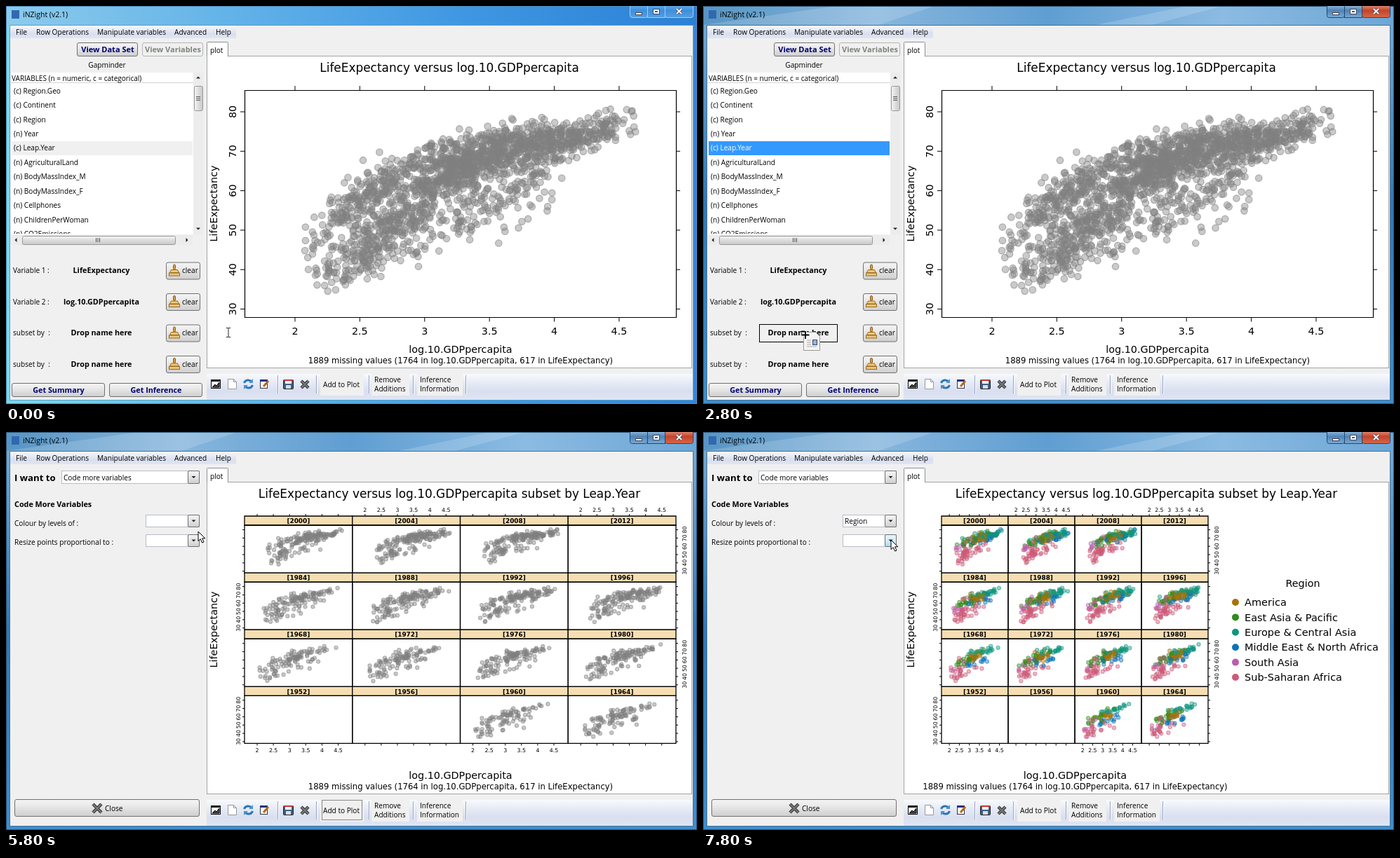
Animation, 985 px wide and 568 px high, one loop 8000 ms. Source, as an HTML page with a canvas:

```html
<!DOCTYPE html>
<html lang="en">
<head>
<meta charset="utf-8">
<title>iNZight</title>
<style>
html, body { margin: 0; width: 985px; height: 568px; overflow: hidden; background: #f0f0f0; }
body > svg, canvas { position: absolute; left: 0; top: 0; }
text { white-space: pre; }
.ui { font-family: "Open Sans", "Noto Sans", sans-serif; }
.plot { font-family: "DejaVu Sans", sans-serif; }
</style>
</head>
<body>
<svg id="base" width="985" height="568" viewBox="0 0 985 568"></svg>
<canvas id="dots" width="985" height="568"></canvas>
<svg id="top" width="985" height="568" viewBox="0 0 985 568"></svg>
<script>
const base = document.getElementById('base'), top_ = document.getElementById('top');
const ctx = document.getElementById('dots').getContext('2d');

// ---- drawing helpers ----
function el(parent, tag, attrs = {}) {
  const e = document.createElementNS('http://www.w3.org/2000/svg', tag);
  for (const k in attrs) e.setAttribute(k, attrs[k]);
  return parent.appendChild(e);
}
const group = (p, attrs) => el(p, 'g', attrs);
function box(p, x, y, w, h, fill, stroke, rx = 0) {
  const o = stroke ? 0.5 : 0;
  return el(p, 'rect', { x: x + o, y: y + o, width: w - 2 * o, height: h - 2 * o, fill, stroke: stroke || 'none', rx });
}
const path = (p, d, stroke, width = 1, fill = 'none') =>
  el(p, 'path', { d, fill, stroke: stroke || 'none', 'stroke-width': width });
// y is the middle of the capitals
function text(p, s, x, y, o = {}) {
  const size = o.size || 10.1;
  const a = { x, y: y + size * 0.36, 'font-size': size, fill: o.fill || '#000', class: o.plot ? 'plot' : 'ui', 'text-anchor': o.anchor || 'start' };
  if (o.bold) a['font-weight'] = 700;
  if (o.turn) a.transform = `rotate(-90 ${x} ${y})`;
  const t = el(p, 'text', a);
  t.textContent = s;
  return t;
}
const bold = (p, s, x, y, o) => text(p, s, x, y, { size: 10.8, bold: 1, anchor: 'middle', ...o });
const label = (p, s, x, y, size = 14.3, o) => text(p, s, x, y, { size, plot: 1, anchor: 'middle', ...o });

const defs = el(base, 'defs');
function gradient(id, vertical, ...stops) {
  const g = el(defs, 'linearGradient', vertical ? { id, x2: 0, y2: 1 } : { id });
  stops.forEach((c, i) => el(g, 'stop', { offset: i / (stops.length - 1), 'stop-color': c }));
}
gradient('btn', 1, '#f4f4f4', '#ebebeb', '#dcdcdc', '#cfcfcf');
gradient('btnBlue', 1, '#e6f5fd', '#d2edfb', '#a9daf5');
gradient('bar', 1, '#f8fafd', '#e6ebf6', '#d9dfef', '#dfe5f3');
gradient('thumb', 0, '#f5f5f5', '#dcdcdc', '#c8c8c8');
gradient('thumbH', 1, '#f5f5f5', '#dcdcdc', '#c8c8c8');
gradient('idle', 0, '#8ccbec', '#62b2e8', '#3f97e2', '#2b80d6');
gradient('idleFrame', 0, '#7ad9ea', '#5cbcea', '#3f9ee6', '#2f86dc');
gradient('live', 0, '#5795c4', '#87b6dd', '#5f9ed2', '#8bbbe2', '#6da6d6');
gradient('liveFrame', 1, '#79aed8', '#2f78b8', '#3d8fd0');
gradient('red', 1, '#e8a28f', '#c4432a', '#d6684a');
gradient('cap', 1, '#6db2ea', '#3f8edb', '#559fe2');
gradient('capLive', 1, '#a6c8e6', '#4f83b5', '#79aad6');

const button = (p, x, y, w, h, fill = 'url(#btn)') => box(p, x, y, w, h, fill, '#707070', 2.5);
const cross = (p, x, y, s = 5) => {
  const d = `M${x - s},${y - s}L${x + s},${y + s}M${x + s},${y - s}L${x - s},${y + s}`;
  path(p, d, '#333', 4.4);
  path(p, d, '#777', 2.4);
};
const arrow = (p, x, y, dir, s = 3) => path(p, {
  up: `M${x - s},${y + 1.5}h${2 * s}l${-s},${-s}z`, down: `M${x - s},${y - 1.5}h${2 * s}l${-s},${s}z`,
  left: `M${x + 1.5},${y - s}v${2 * s}l${-s},${-s}z`, right: `M${x - 1.5},${y - s}v${2 * s}l${s},${-s}z`
}[dir], 0, 0, '#222');
const grip = (p, x, y, flat) => {
  for (let k = -1; k < 2; k++) path(p, flat ? `M${x + k * 2.5},${y - 3}v6` : `M${x - 3},${y + k * 2.5}h6`, '#555', 1);
};

// ---- window chrome ----
function chrome(live) {
  const g = group(base), n = live ? 'live' : 'idle';
  box(g, 0, 0, 985, 568, `url(#${n}Frame)`);
  box(g, 0, 0, 985, 27, `url(#${n})`);
  if (live) path(g, 'M0,27L190,0H330L250,27zM560,27L690,0H740L640,27z', 0, 0, 'rgba(255,255,255,.16)');
  box(g, 0, 0, 985, 568, 'none', live ? '#28506f' : '#4a8cba');
  const edge = live ? '#24476b' : '#a4cdf0', cap = live ? 'url(#capLive)' : 'url(#cap)';
  box(g, 889, -4, 26, 21, cap, edge, 3);
  box(g, 914, -4, 26, 21, cap, edge);
  box(g, 939, -4, 41, 21, live ? 'url(#red)' : cap, edge, 3);
  box(g, 897, 9, 10, 4, '#fff', '#445');
  box(g, 922, 4, 10, 8, '#fff', '#445');
  box(g, 925, 7, 4, 2, '#557');
  const x = 'M956,4l7,7M963,4l-7,7';
  path(g, x, '#445', 3.6);
  path(g, x, '#fff', 2);
  box(g, 5, 27, 975, 536, '#f0f0f0', live ? '#46708f' : '#5f9cc4');
  return g;
}
const idle = chrome(false), live = chrome(true);
box(base, 8, 6, 11, 12, '#3268b0');
text(base, 'iNZight (v2.1)', 24, 12, { size: 10.5 });

box(base, 6, 28, 322, 18, 'url(#bar)');
[['File', 14], ['Row Operations', 43], ['Manipulate variables', 130], ['Advanced', 240], ['Help', 299]]
  .forEach(([s, x]) => text(base, s, x, 37));
box(base, 286, 71, 692, 446, '#fff', '#a0a3a8');
box(base, 286, 51, 31, 22, '#fff', '#8e9095', 1);
box(base, 287, 70, 29, 4, '#fff');
text(base, 'plot', 291, 63);

// ---- toolbar ----
box(base, 286, 525, 693, 37, 'url(#bar)');
[387, 442, 517, 580, 655].forEach(x => {
  box(base, x, 527, 1, 26, '#9aa3bb');
  box(base, x + 1, 527, 1, 26, '#fff');
});
const hoverX = group(base);
button(hoverX, 414, 523, 23, 33);
[[448, 62], [521, 54], [586, 65]].forEach(([x, w]) => box(base, x, 524, w, 32, '#f0f0f0'));
const hoverAdd = group(base), focusAdd = group(base);
button(hoverAdd, 448, 523, 62, 33);
box(focusAdd, 450, 525, 58, 29, 'none', '#222').setAttribute('stroke-dasharray', '1 1');
text(base, 'Add to Plot', 452, 540);
text(base, 'Remove', 525, 533);
text(base, 'Additions', 525, 546.5);
text(base, 'Inference', 590, 533);
text(base, 'Information', 590, 546.5);
box(base, 292, 533, 14, 13, '#fff', '#000');
box(base, 292, 533, 14, 3, '#111');
path(base, 'M294,544l4,-4 2,2 4,-5v7z', '#000', 1, '#444');
path(base, 'M316.5,532.5h8l4,4v10h-12zM324.5,532.5v4h4', '#999', 1, '#fff');
path(base, 'M339.5,538a6,5.5 0 0 1 10.5,-2M351.5,541a6,5.5 0 0 1 -10.5,2', '#2f76b5', 3);
path(base, 'M352,532v6h-6zM339,547v-6h6z', 0, 0, '#4a93cf');
box(base, 362, 533, 11, 13, '#fff', '#334');
box(base, 362, 533, 11, 3, '#237');
path(base, 'M367,543l7,-8', '#b5651d', 3);
box(base, 395, 533, 15, 14, '#3d5f86', '#222', 1);
box(base, 398, 534, 9, 5, '#fff');
box(base, 396, 533, 13, 2, '#c33');
box(base, 399, 541, 7, 5, '#ddd');
cross(base, 426, 540);

// ---- variable panel ----
const vars = ['(c) Region.Geo', '(c) Continent', '(c) Region', '(n) Year', '(c) Leap.Year', '(n) AgriculturalLand',
  '(n) BodyMassIndex_M', '(n) BodyMassIndex_F', '(n) Cellphones', '(n) ChildrenPerWoman', '(n) CO2Emissions'];

function clearButton(p, x, y) {
  button(p, x, y - 12, 49, 25);
  box(p, x + 10, y - 9, 4, 8, '#d8a04a', '#8a5a1c', 1.5);
  path(p, `M${x + 5.5},${y + 3}l2,-4h9l2,4z`, '#9a6b22', 1, '#efc778');
  box(p, x + 4, y + 3, 16, 5, '#e9c47c', '#9a6b22');
  text(p, 'clear', x + 23, y);
}

function variablePanel(multi) {
  const g = group(base), dy = multi ? -34 : 0, h = 214 + dy;
  button(g, 101, 52, 87, 20);
  bold(g, 'View Data Set', 145, 62, { fill: '#000070', size: 11 });
  box(g, 194, 52, 87, 20, '#f0f0f0', '#b5b5b5', 2.5);
  bold(g, 'View Variables', 238, 62, { fill: '#7d857d', size: 11 });
  text(g, 'Gapminder', 144, 84, { anchor: 'middle' });

  box(g, 7, 95, 260, 231 + dy, '#fff');
  box(g, 7, 109, 260, 1, '#d0d3d8');
  text(g, 'VARIABLES (n = numeric, c = categorical)', 8, 103, { size: 10 });
  const list = el(g, 'svg', { x: 7, y: 111, width: 260, height: h, viewBox: `7 111 260 ${h}` });
  const row = box(list, 8, 193, 258, 20, '#f0f0f0');
  const names = vars.map((s, i) => text(list, s, 11, 121 + 20.45 * i));
  box(g, 267, 95, 14, 231 + dy, '#ececec');
  arrow(g, 274, 102, 'up');
  arrow(g, 274, 318 + dy, 'down');
  const th = multi ? 24 : 36;
  box(g, 268, 114, 13, th, 'url(#thumb)', '#979797', 2);
  grip(g, 274, 114 + th / 2);
  box(g, 7, 327 + dy, 259, 14, '#ececec');
  arrow(g, 14, 334 + dy, 'left');
  arrow(g, 258, 334 + dy, 'right');
  box(g, 23, 328 + dy, 219, 13, 'url(#thumbH)', '#979797', 2);
  grip(g, 131, 334 + dy, true);

  const bx = multi ? 231 : 228, drop = 'Drop name here';
  [['Variable 1 :', 'LifeExpectancy', 377.5 + dy], ['Variable 2 :', 'log.10.GDPpercapita', 422 + dy],
    ['subset by  :', multi ? 'Leap.Year' : drop, 466.5 + dy], ['subset by  :', drop, 511]]
    .forEach(([a, b, y]) => {
      text(g, a, 10, y);
      bold(g, b, 136, y);
      clearButton(g, bx, y);
    });
  if (multi) {
    text(g, '_MULTI', 8, 462);
    box(g, 9, 479, 235, 1, '#b0b0b0');
    box(g, 9, 472, 9, 14, 'url(#btn)', '#777', 2);
    button(g, 252, 456, 29, 32);
    text(g, 'play', 267, 472, { anchor: 'middle' });
  }
  [['Get Summary', 8], ['Get Inference', 147]].forEach(([s, x]) => {
    button(g, x, 538, 133, 20);
    bold(g, s, x + 67, 548.5, { fill: '#000070' });
  });
  return {
    g,
    select(on) {
      row.setAttribute('fill', on ? '#3399ff' : '#f0f0f0');
      names[4].setAttribute('fill', on ? '#fff' : '#000');
    }
  };
}
const plain = variablePanel(false), subset = variablePanel(true);
const dropBox = box(base, 80, 454, 112, 26, 'none', '#000');

// ---- coding panel ----
const coding = group(base);
function combo(x, y, w, h) {
  box(coding, x, y, w, h, '#fff', '#b8bcc4');
  const b = box(coding, x + w - 17, y, 17, h, 'url(#btn)', '#707070', 1.5);
  arrow(coding, x + w - 8.5, y + h / 2, 'down');
  return on => b.setAttribute('fill', on ? 'url(#btnBlue)' : 'url(#btn)');
}
bold(coding, 'I want to', 12, 65, { size: 13.2, anchor: 'start' });
combo(79, 55, 197, 19);
text(coding, 'Code more variables', 82, 65);
bold(coding, 'Code More Variables', 12, 103, { anchor: 'start' });
text(coding, 'Colour by levels of :', 12, 130);
text(coding, 'Resize points proportional to :', 12, 157.5);
const colourHot = combo(199, 118, 77, 18), resizeHot = combo(199, 146, 77, 18);
const chosen = text(coding, 'Region', 202, 127);
button(coding, 12, 524, 264, 25);
cross(coding, 130, 537, 6);
text(coding, 'Close', 141, 537);

// ---- data: one trail of yearly values per country ----
const regions = [ // name, colour, countries, log GDP, spread, life at start, gain, slope, life spread
  ['America', '#a8720a', 34, 3.25, 0.3, 62.5, 10, 7, 2.2],
  ['East Asia & Pacific', '#2f8b1c', 24, 2.85, 0.42, 59, 10, 9, 3],
  ['Europe & Central Asia', '#0e9580', 50, 3.62, 0.46, 69.5, 5, 4.5, 1.3],
  ['Middle East & North Africa', '#0b73b8', 19, 3.35, 0.42, 57, 14.5, 7, 2.5],
  ['South Asia', '#bb5cae', 8, 2.3, 0.15, 46, 17, 9, 4],
  ['Sub-Saharan Africa', '#cc5a78', 47, 2.36, 0.2, 44, 9, 8, 4.5]
];
let seed = 20;
function rnd() {
  seed = (seed + 0x6D2B79F5) | 0;
  let z = Math.imul(seed ^ (seed >>> 15), 1 | seed);
  z = (z + Math.imul(z ^ (z >>> 7), 61 | z)) ^ z;
  return ((z ^ (z >>> 14)) >>> 0) / 4294967296;
}
const gauss = () => (rnd() + rnd() + rnd() - 1.5) * 2;
// bends v smoothly so that it stays within reach of a limit
const bend = (v, from, reach) => (v - from) * reach > 0 ? from + reach * Math.tanh((v - from) / reach) : v;

const data = [];
for (const [name, colour, count, mean, sd, life, gain, slope, spread] of regions) {
  const africa = name.startsWith('Sub');
  for (let c = 0; c < count; c++) {
    const rich = africa && rnd() < 0.35 ? rnd() * 1.1 : 0;
    const dg = gauss() * sd, dl = gauss() * spread, start = rnd(), order = rnd();
    for (let year = 1960; year <= 2008; year += 4) {
      const u = (year - 1960) / 48;
      if (start > 0.5 + 0.5 * u) continue;
      const trend = bend(bend(mean + dg + rich + u * 0.4, 4.2, 0.4), 2.3, -0.25);
      const g = trend + gauss() * 0.05;
      let y = life + gain * u + dl + gauss() * 1.6 + slope * (dg * (1.1 - 0.4 * u) + rich);
      const cap = 75 + (g - 2.9) * 4.4;
      if (y > cap - 3) y = bend(y, cap - 3, 3);
      data.push({ g, y: bend(y, 38, -7), year, colour, order });
    }
  }
}
data.sort((a, b) => a.order - b.order);

// ---- plots ----
const fracX = g => 0.117 + (g - 2) * 0.3005, fracY = y => 0.037 + (y - 30) * 0.01735;
const xTicks = [2, 2.5, 3, 3.5, 4, 4.5], yTicks = [30, 40, 50, 60, 70, 80];
const L = 340, T = 120, H = 324.5, title = 'LifeExpectancy versus log.10.GDPpercapita';

function plotFrame(heading, mid) {
  const g = group(base);
  label(g, heading, 632, 88, 16.93);
  label(g, 'LifeExpectancy', 296, 282, 14.3, { turn: 1 });
  label(g, 'log.10.GDPpercapita', mid, 490);
  label(g, '1889 missing values (1764 in log.10.GDPpercapita, 617 in LifeExpectancy)', mid, 506, 11.6);
  return g;
}
function singlePlot() {
  const g = plotFrame(title, 648), W = 615;
  path(g, `M${L + 0.5},${T + 0.5}h${W}v${H - 0.5}h${-W}z`, '#000', 1.2);
  for (const v of xTicks) {
    const x = L + fracX(v) * W;
    path(g, `M${x},${T}v-6M${x},${T + H}v6`, '#000');
    label(g, v, x, 463.5);
  }
  for (const v of yTicks) {
    const y = T + H - fracY(v) * H;
    path(g, `M${L},${y}h-6M${L + W},${y}h6`, '#000');
    label(g, v, 323, y, 14.3, { turn: 1 });
  }
  return g;
}
const rowH = 81.1, strip = 13, bodyH = rowH - strip;
function gridPlot(W, mid) {
  const g = plotFrame(title + ' subset by Leap.Year', mid), cw = W / 4;
  for (let r = 0; r < 4; r++) for (let c = 0; c < 4; c++) {
    const x = L + c * cw, y = T + r * rowH;
    path(g, `M${x},${y}h${cw}v${strip}h${-cw}z`, '#000', 1.3, '#f6deb2');
    path(g, `M${x},${y + strip}h${cw}v${bodyH}h${-cw}z`, '#000', 1.3);
    label(g, `[${1952 + 4 * ((3 - r) * 4 + c)}]`, x + cw / 2, y + 7, 8.9, { bold: 1 });
  }
  for (let k = 0; k < 4; k++) {
    for (const v of xTicks) {
      const x = L + (k + fracX(v)) * cw;
      path(g, `M${x},${T}v-3M${x},${T + H}v3`, '#000');
      label(g, v, x, k % 2 ? 111.5 : 454, 7.8);
    }
    for (const v of yTicks) {
      const y = T + (k + 1) * rowH - fracY(v) * bodyH;
      path(g, `M${L},${y}h-3M${L + W},${y}h3`, '#000');
      label(g, v, k % 2 ? 331 : L + W + 12, y, 7.8, { turn: 1 });
    }
  }
  return g;
}
const plots = [singlePlot(), gridPlot(615, 648), gridPlot(380, 530.5)];
label(plots[2], 'Region', 855, 215.5);
regions.forEach(([name, colour], i) => {
  const y = 243 + i * 21.4;
  el(plots[2], 'circle', { cx: 759, cy: y, r: 5, fill: colour });
  label(plots[2], name, 772, y, 14.5, { anchor: 'start' });
});

function drawDots(kind) {
  ctx.clearRect(0, 0, 985, 568);
  const single = kind === 0, cw = single ? 615 : kind === 1 ? 615 / 4 : 95;
  ctx.lineWidth = single ? 1.3 : 1.1;
  for (const d of data) {
    const k = (d.year - 1952) / 4, col = single ? 0 : k % 4, row = single ? 3 : 3 - Math.floor(k / 4);
    const x = L + (col + fracX(d.g)) * cw;
    const y = single ? T + H - fracY(d.y) * H : T + (row + 1) * rowH - fracY(d.y) * bodyH;
    ctx.beginPath();
    ctx.arc(x, y, single ? 4.7 : 2.6, 0, 7);
    ctx.fillStyle = ctx.strokeStyle = kind === 2 ? d.colour : '#808080';
    ctx.globalAlpha = 0.42;
    ctx.fill();
    ctx.globalAlpha = 0.55;
    ctx.stroke();
  }
}

// ---- drop-down list ----
const popup = group(top_);
box(popup, 199, 136, 77, 440, '#fff', '#888');
box(popup, 261, 137, 14, 431, '#ececec');
arrow(popup, 268, 146, 'up');
box(popup, 261, 153, 13, 338, 'url(#thumb)', '#979797', 2);
grip(popup, 267, 321);
const hoverItem = box(popup, 201, 0, 58, 20, '#f0f0f0');
['Country', 'Regi....Geo', 'Continent', 'Region', 'Year', 'Leap.Year', 'Agri...Land', 'Body...x_M', 'Bod...ex_F', 'Cell...ones',
  'Chil...man', 'CO2...ions', 'Dem...core', 'Ener...rson', 'Exports', 'Fem...rate', 'Forestarea', 'GDP...pita', 'log.1...pita', 'Gov...total']
  .forEach((s, i) => text(popup, s, 205, 169 + i * 20.48));

// ---- pointers, hot spot at 0,0 ----
const pointers = { beam: group(top_), arrow: group(top_), drag: group(top_), plus: group(top_) };
path(pointers.beam, 'M-3,-6.5h2.5l.5,.5 .5,-.5h2.5M-3,6.5h2.5l.5,-.5 .5,.5h2.5M0,-6v12', '#222');
path(pointers.arrow, 'M0,0V13.5L3.2,10.6L5.6,16L8,15L5.6,9.8H9.8z', '#000', 1, '#fff');
function plus(p) {
  const d = 'M-6,-4.5h5M0,-5v11M-5.5,.5h11';
  path(p, d, '#fff', 4);
  path(p, d, '#000', 1.8);
}
path(pointers.drag, 'M-2.5,-3.5h17l6,6v20h-23z', '#999', 1, '#f4f4f4');
path(pointers.drag, 'M2,8h6M2,11h6M2,14h6M2,17h14', '#aaa');
box(pointers.drag, 10, 7, 7, 8, '#8db7dd', '#446');
plus(pointers.drag);
plus(pointers.plus);

const moves = [ // ms, x, y, pointer
  [0, 317, 466, 'beam'], [800, 298, 448, 'arrow'], [1000, 232, 382, 'arrow'], [1200, 148, 295, 'arrow'], [1400, 82, 225, 'arrow'],
  [1600, 58, 198, 'arrow'], [2000, 66, 226, 'drag'], [2200, 84, 290, 'drag'], [2400, 108, 370, 'drag'], [2600, 132, 438, 'drag'],
  [2800, 146, 469, 'drag'], [3000, 146, 469, 'arrow'], [3400, 215, 486, 'arrow'], [3600, 330, 514, 'arrow'], [3800, 416, 532, 'arrow'],
  [4000, 452, 536, 'arrow'], [4200, 474, 538, 'arrow'], [4400, 477, 543, 'plus'], [5000, 460, 500, 'arrow'], [5200, 412, 405, 'arrow'],
  [5400, 352, 285, 'arrow'], [5600, 302, 190, 'arrow'], [5800, 274, 142, 'arrow'], [6000, 267, 125, 'arrow'], [6600, 254, 165, 'arrow'],
  [6800, 240, 205, 'arrow'], [7000, 236, 226, 'arrow'], [7400, 256, 184, 'arrow'], [7600, 268, 159, 'arrow'], [7800, 268, 154, 'arrow']
];

const show = (e, on) => { e.style.display = on ? '' : 'none'; };
let last = -1, lastPlot = -1;
function render(step) {
  const t = step * 200, within = (a, b) => t >= a && t < b;
  show(idle, t < 1800);
  show(live, t >= 1800);
  show(plain.g, t < 3000);
  plain.select(t >= 1800);
  show(subset.g, within(3000, 4600));
  subset.select(t < 4400);
  show(dropBox, within(2600, 3000));
  show(coding, t >= 4600);
  show(chosen, t >= 7200);
  colourHot(within(6000, 7200));
  resizeHot(t >= 7800);
  show(hoverX, within(3800, 4000));
  show(hoverAdd, within(4000, 5000));
  show(focusAdd, within(4400, 6200));
  show(popup, within(6200, 7200));
  show(hoverItem, within(6600, 7200));
  hoverItem.setAttribute('y', t < 6800 ? 159 : t < 7000 ? 200 : 220.5);

  const kind = t < 3000 ? 0 : t < 7400 ? 1 : 2;
  if (kind !== lastPlot) {
    plots.forEach((p, i) => show(p, i === kind));
    drawDots(lastPlot = kind);
  }
  const [, x, y, name] = moves.filter(m => m[0] <= t).pop();
  for (const k in pointers) show(pointers[k], k === name);
  pointers[name].setAttribute('transform', `translate(${x} ${y})`);
}

const begin = performance.now();
function tick() {
  const step = Math.floor(((performance.now() - begin) % 8000) / 200);
  if (step !== last) render(last = step);
  requestAnimationFrame(tick);
}
tick();
</script>
</body>
</html>
```
